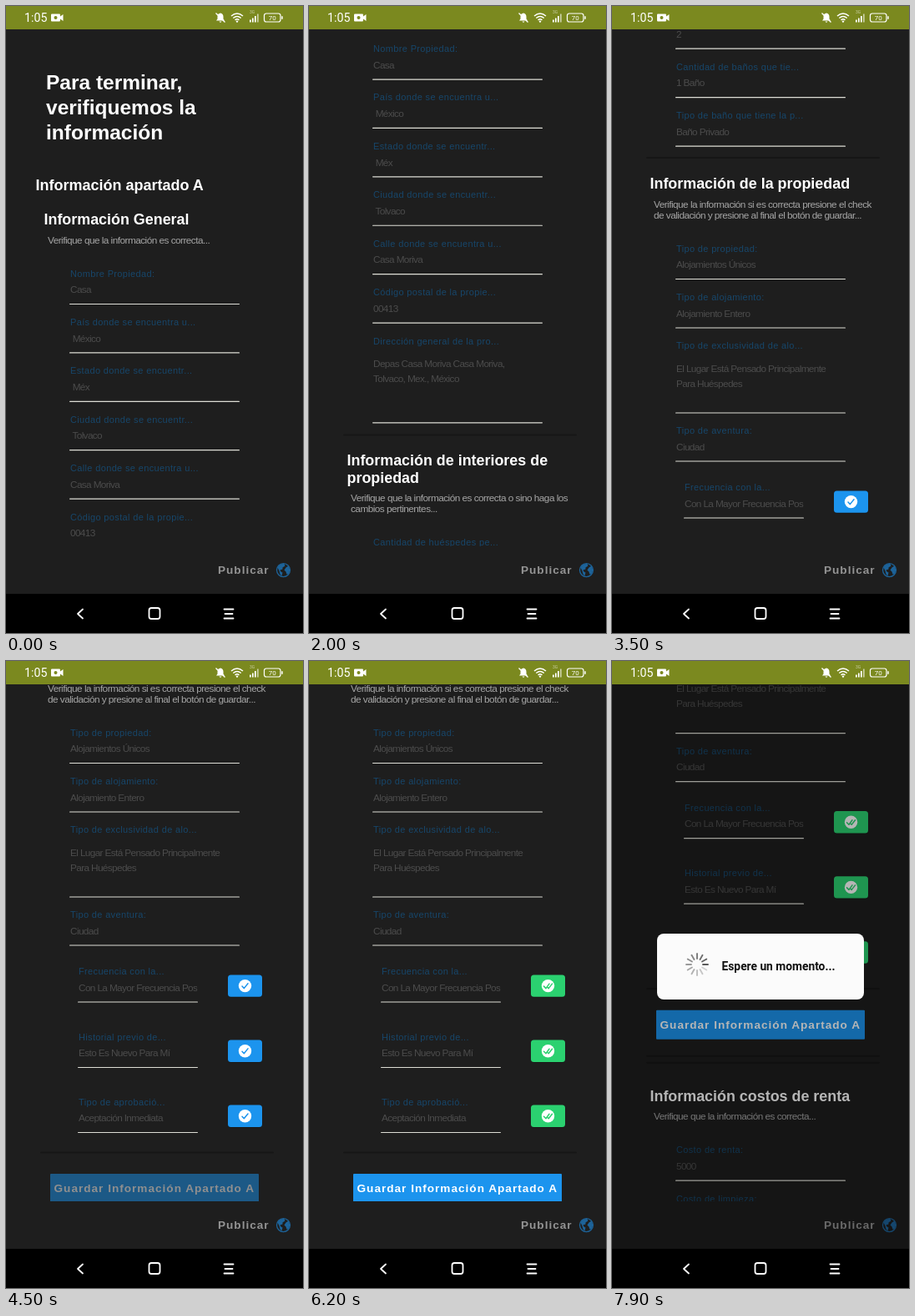
An HTML page for the animation above (8 s loop, 356 px wide and 752 px high).

```html
<!DOCTYPE html>
<html lang="es">
<head>
<meta charset="utf-8">
<style>
  html, body { margin: 0; width: 100%; height: 100%; overflow: hidden; background: #1e1e1e; }
  #stage { display: block; width: 100vw; height: 100vh; }
  text { font-family: "Liberation Sans", Arial, sans-serif; white-space: pre; }
  .h { font-weight: 700; fill: #fff; }
  .label { font-size: 11px; letter-spacing: .35px; fill: #17466a; }
  .sub { font-size: 11.8px; letter-spacing: -.53px; fill: #a6a6a6; }
  .value { font-size: 11.8px; letter-spacing: -.63px; fill: #4c4c4c; }
  .btn { font-size: 13.6px; font-weight: 700; letter-spacing: 1px; fill: #fff; }
  .ui { font-family: Roboto, "Noto Sans", sans-serif; }
</style>
</head>
<body>
<svg id="stage" viewBox="0 0 356 752">
  <rect width="356" height="752" fill="#1e1e1e"/>
  <svg x="0" y="28" width="356" height="620" viewBox="0 28 356 620">
    <clipPath id="fit"><rect x="80" y="1580" width="149.5" height="60"/></clipPath>
    <g id="page"></g>
  </svg>

  <g opacity=".52">
    <text class="btn" x="254" y="681">Publicar</text>
  </g>
  <g id="globe" transform="translate(332.5 676.6)">
    <circle r="8" fill="none" stroke="#1d6399" stroke-width="1.3"/>
    <path d="M-7-3C-5-7-2-8 1-7.5L2-5-1-3-1-1-4 0-3 2-1 3-2 7-4 5-5 1ZM3-3 6-5 8 0 6 5 4 5 3 2 1 0Z" fill="#1d6399"/>
  </g>

  <rect id="shade" y="28" width="356" height="677" fill="#000"/>
  <g id="dialog">
    <rect x="54" y="328" width="248" height="79" rx="8" fill="#000" opacity=".35"/>
    <rect x="54" y="327" width="248" height="79" rx="8" fill="#fbfbfb"/>
    <g id="spinner" transform="translate(102 364)" stroke-width="1.9" stroke-linecap="round"></g>
    <text class="ui" x="131.5" y="371" font-size="13.8" font-weight="700" fill="#111">Espere un momento...</text>
  </g>

  <rect width="356" height="28" fill="#7b891f"/>
  <g fill="#fff">
    <text class="ui" x="22" y="19.3" font-size="14.2">1:05</text>
    <path d="M55 9.5h9q1 0 1 1v2l3.5-2.5v8L65 15.5v2q0 1-1 1h-9q-1 0-1-1v-7q0-1 1-1Z"/>
    <circle cx="59.5" cy="14" r="2" fill="#7b891f"/>
    <path d="M252 17.5 253.5 15.5V13q0-4 3.5-4.5 3.5.5 3.5 4.5v2.5l1.5 2ZM255.5 18.5h3q-1.5 2.5-3 0Z"/>
    <path d="M251.5 8.5 262.5 19.5" stroke="#fff" stroke-width="1.3"/>
    <g fill="none" stroke="#fff" stroke-width="1.5">
      <path d="M270 12q7-6 14 0M272.3 14.5q4.7-4 9.4 0M274.6 16.8q2.4-2 4.8 0"/>
      <rect x="309.5" y="9" width="19.5" height="10" rx="2.5" stroke-width="1.2"/>
      <path d="M331 12.3v3.4"/>
    </g>
    <circle cx="277" cy="18.6" r="1.2"/>
    <path d="M292 16.5h1.7v3H292ZM295 14.5h1.7v5H295ZM298 12h1.7v7.5H298Z"/>
    <path d="M301 9.5h1.7v10H301Z" opacity=".6"/>
    <text class="ui" x="292" y="9" font-size="5" opacity=".6">3G</text>
    <text class="ui" x="319.3" y="17" font-size="8" text-anchor="middle">70</text>
  </g>

  <rect y="705" width="356" height="47" fill="#000"/>
  <g fill="none" stroke="#fff" stroke-width="1.8" stroke-linecap="round" stroke-linejoin="round">
    <path d="M92 723.5 86 729 92 734.5"/>
    <rect x="171.5" y="722" width="13" height="13" rx="2.8"/>
    <path d="M261.5 723.5h11M262.5 729h9M261.5 734.5h11"/>
  </g>
</svg>
<script>
const NS = "http://www.w3.org/2000/svg";
const $ = id => document.getElementById(id);
const page = $("page");

function add(parent, tag, attrs, text) {
  const el = document.createElementNS(NS, tag);
  for (const k in attrs) el.setAttribute(k, attrs[k]);
  if (text) el.textContent = text;
  parent.appendChild(el);
  return el;
}

// Vertical places below are centres of the text rows on the unscrolled page.
const write = (cls, x, y, text, more) => add(page, "text", { class: cls, x, y, ...more }, text);
const title = (x, y, size, text) => write("h", x, y + size * .34, text, { "font-size": size });
const sub = (y, text) => write("sub", 50, y + 4, text);

function rule(x, y, w) {
  add(page, "rect", { x: x - 1, y: y - .6, width: w, height: 1.2, rx: .6, fill: "#deded6" });
}

function field(y, label, value, x = 77, w = 204, more) {
  write("label", x, y + 4, label);
  write("value", x, y + 23.7, value, more);
  rule(x, y + 37, w);
}

function area(y, label, lines, bottom) {
  write("label", 77, y + 4, label);
  lines.forEach((s, i) => write("value", 77, y + 31.5 + i * 18, s));
  rule(77, bottom, 204);
}

function edge(y) {
  add(page, "rect", { x: 41, y: y - 1, width: 280, height: 2, rx: 1, fill: "#161616" });
}

function checkButton(y) {
  const g = add(page, "g", { transform: `translate(286.5 ${y})` });
  add(g, "rect", { x: -20.5, y: -12, width: 41, height: 26, rx: 3.5, fill: "#121212", opacity: .6 });
  const box = add(g, "rect", { x: -20.5, y: -13.2, width: 41, height: 26.4, rx: 3.5 });
  add(g, "circle", { r: 7.7, fill: "#fff" });
  const tick = add(g, "path", { fill: "none", "stroke-width": 1.5, "stroke-linecap": "round", "stroke-linejoin": "round" });
  return done => {
    const color = done ? "#2bd170" : "#1c94ee";
    box.setAttribute("fill", color);
    tick.setAttribute("stroke", color);
    tick.setAttribute("d", done ? "M-5 .5-2.5 3 1.5-2.5M-.3 2 .7 3 5-2.5" : "M-3.5 .5-1.2 3 3.5-2.8");
  };
}

["Para terminar,", "verifiquemos la", "información"].forEach((s, i) => title(48, 91.6 + i * 29.8, 24.5, s));
title(35.5, 215, 18, "Información apartado A");
title(45.5, 256, 17.9, "Información General");
sub(280.5, "Verifique que la información es correcta...");
[
  ["Nombre Propiedad:", "Casa"],
  ["País donde se encuentra u...", " México"],
  ["Estado donde se encuentr...", " Méx"],
  ["Ciudad donde se encuentr...", " Tolvaco"],
  ["Calle donde se encuentra u...", "Casa Moriva"],
  ["Código postal de la propie...", "00413"]
].forEach(([a, b], i) => field(320.5 + i * 58.4, a, b));
area(671, "Dirección general de la pro...", ["Depas Casa Moriva Casa Moriva,", "Tolvaco, Mex., México"], 769.3);
edge(784);

title(45.5, 814, 17.9, "Información de interiores de");
title(45.5, 835.5, 17.9, "propiedad");
sub(859.5, "Verifique que la información es correcta o sino haga los");
sub(872.5, "cambios pertinentes...");
[
  ["Cantidad de huéspedes pe...", "2"],
  ["Cantidad de habitaciones q...", "2"],
  ["Cantidad de camas que te...", "2"],
  ["Cantidad de baños que tie...", "1 Baño"],
  ["Tipo de baño que tiene la p...", "Baño Privado"]
].forEach(([a, b], i) => field(912.2 + i * 58.5, a, b));
edge(1197);

title(45.5, 1228, 17.9, "Información de la propiedad");
sub(1252.5, "Verifique la información si es correcta presione el check");
sub(1265.5, "de validación y presione al final el botón de guardar...");
field(1305.5, "Tipo de propiedad:", "Alojamientos Únicos");
field(1364, "Tipo de alojamiento:", "Alojamiento Entero");
area(1422, "Tipo de exclusividad de alo...", ["El Lugar Está Pensado Principalmente", "Para Huéspedes"], 1503);
field(1524, "Tipo de aventura:", "Ciudad");
field(1592, "Frecuencia con la...", "Con La Mayor Frecuencia Posible", 87, 144, { "clip-path": "url(#fit)" });
field(1670.5, "Historial previo de...", "Esto Es Nuevo Para Mí", 87, 144);
field(1748.5, "Tipo de aprobació...", "Aceptación Inmediata", 87, 144);
const checks = [1609.6, 1687.7, 1765.8].map(checkButton);
const checkTimes = [4600, 5500, 6200];
edge(1809.5);

const save = add(page, "g", {});
add(save, "rect", { x: 53, y: 1835, width: 250, height: 35, rx: 1, fill: "#1c94ee" });
add(save, "text", { class: "btn", x: 57.5, y: 1857.3 }, "Guardar Información Apartado A");
edge(1890);
edge(1898);

title(45.5, 1938, 17.9, "Información costos de renta");
sub(1962.5, "Verifique que la información es correcta...");
field(2002.5, "Costo de renta:", "5000");
field(2061, "Costo de limpieza:", "500");

const spokes = Array.from({ length: 12 }, (_, i) =>
  add($("spinner"), "path", { d: "M0-7V-13", transform: `rotate(${i * 30})`, stroke: "#333" }));

// Monotone cubic through [time, offset] keys.
const keys = [[0, 0], [1150, 0], [1400, 83], [2600, 484], [3500, 1015], [4300, 1220],
  [6400, 1220], [6700, 1404.3], [7000, 1416.3], [8000, 1416.3]];
const rate = i => (keys[i + 1][1] - keys[i][1]) / (keys[i + 1][0] - keys[i][0]);
function slope(i) {
  if (i < 1 || i > keys.length - 2) return 0;
  const a = rate(i - 1), b = rate(i);
  return a * b > 0 ? 2 * a * b / (a + b) : 0;
}
function scrollAt(t) {
  let i = 0;
  while (i < keys.length - 2 && t >= keys[i + 1][0]) i++;
  const [t0, y0] = keys[i], [t1, y1] = keys[i + 1];
  const d = t1 - t0, u = (t - t0) / d, v = 1 - u;
  return y0 * v * v * (1 + 2 * u) + y1 * u * u * (3 - 2 * u)
    + d * u * v * (v * slope(i) - u * slope(i + 1));
}

const clamp = x => Math.max(0, Math.min(1, x));

function draw(t) {
  page.setAttribute("transform", `translate(0 ${-scrollAt(t).toFixed(2)})`);
  checks.forEach((set, i) => set(t >= checkTimes[i]));
  const pressed = t === 7300;
  save.setAttribute("opacity", t < checkTimes[2] ? .5 : pressed ? .85 : 1);
  const show = clamp((t - 7300) / 200);
  $("shade").setAttribute("opacity", .29 * show);
  $("dialog").setAttribute("opacity", show);
  const head = 3 + (t - 7900) / 1000 * 12;
  spokes.forEach((s, i) => {
    const age = (((head - i) % 12) + 12) % 12;
    s.setAttribute("opacity", (.8 - age / 12 * .65).toFixed(2));
  });
}

const start = performance.now();
function tick(now) {
  draw(Math.floor(Math.max(0, now - start) % 8000 / 100) * 100);
  requestAnimationFrame(tick);
}
draw(0);
requestAnimationFrame(tick);
</script>
</body>
</html>
```
